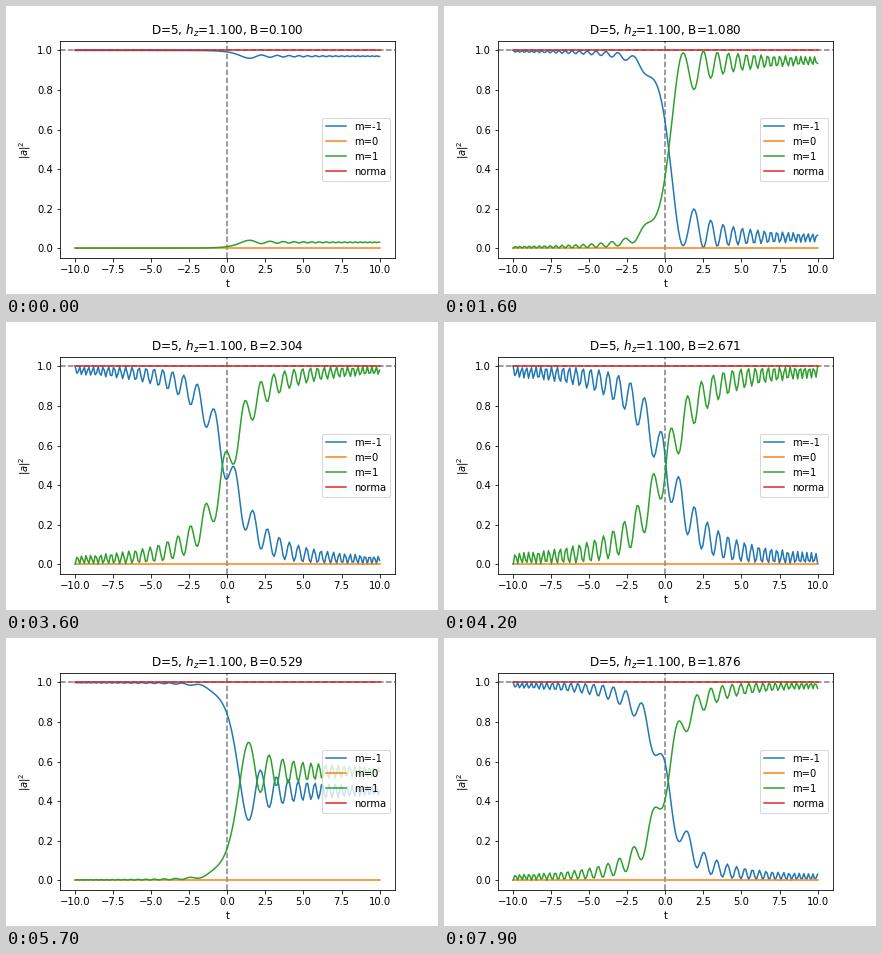
A matplotlib script that plays this animation: 432 by 288 pixels, repeating every 8 s.

```python
import numpy as np
import matplotlib.pyplot as plt
from matplotlib.animation import FuncAnimation

D, HZ = 5, 1.1
FRAMES, INTERVAL = 80, 100
SAMPLES, SUBSTEPS = 200, 24

fields = np.linspace(0.1, 3.1, 50)
times = np.linspace(-10, 10, SAMPLES)


def evolve(b):
    """Occupations of m=-1 and m=+1 under a linear sweep, for every field at once."""
    down = np.ones(b.size, complex)
    up = np.zeros(b.size, complex)
    dt = (times[1] - times[0]) / SUBSTEPS
    out = np.empty((SAMPLES, 2, b.size))
    out[0] = np.abs(down) ** 2, np.abs(up) ** 2
    for k in range(1, SAMPLES):
        for j in range(SUBSTEPS):
            e = HZ * (times[k - 1] + (j + 0.5) * dt)
            w = np.hypot(e, b)
            c, s = np.cos(w * dt), -1j * np.sin(w * dt) / w
            down, up = (c * down + s * (b * up - e * down),
                        c * up + s * (b * down + e * up))
        out[k] = np.abs(down) ** 2, np.abs(up) ** 2
    return out


occupation = evolve(fields)

plt.rcParams["font.family"] = "DejaVu Sans"
fig, ax = plt.subplots(figsize=(6, 4), dpi=72)
fig.subplots_adjust(left=0.125, right=0.9, bottom=0.125, top=0.88)
ax.axhline(1, color="gray", ls="--")
ax.axvline(0, color="gray", ls="--")
zero = np.zeros(SAMPLES)
lines = [ax.plot(times, zero, color=color, label=label)[0]
         for color, label in (("C0", "m=-1"), ("C1", "m=0"),
                              ("C2", "m=1"), ("C3", "norma"))]
ax.set(xlim=(-11, 11), ylim=(-0.05, 1.05), xlabel="t", ylabel="$|a|^2$")
ax.legend(loc="center right")
title = ax.set_title("")


def update(frame):
    i = frame % fields.size
    down, up = occupation[:, 0, i], occupation[:, 1, i]
    for line, y in zip(lines, (down, zero, up, down + up)):
        line.set_ydata(y)
    title.set_text(f"D={D}, $h_z$={HZ:.3f}, B={fields[i]:.3f}")
    return [*lines, title]


anim = FuncAnimation(fig, update, frames=FRAMES, interval=INTERVAL,
                     repeat=True, repeat_delay=0, blit=False)
plt.show()
```
